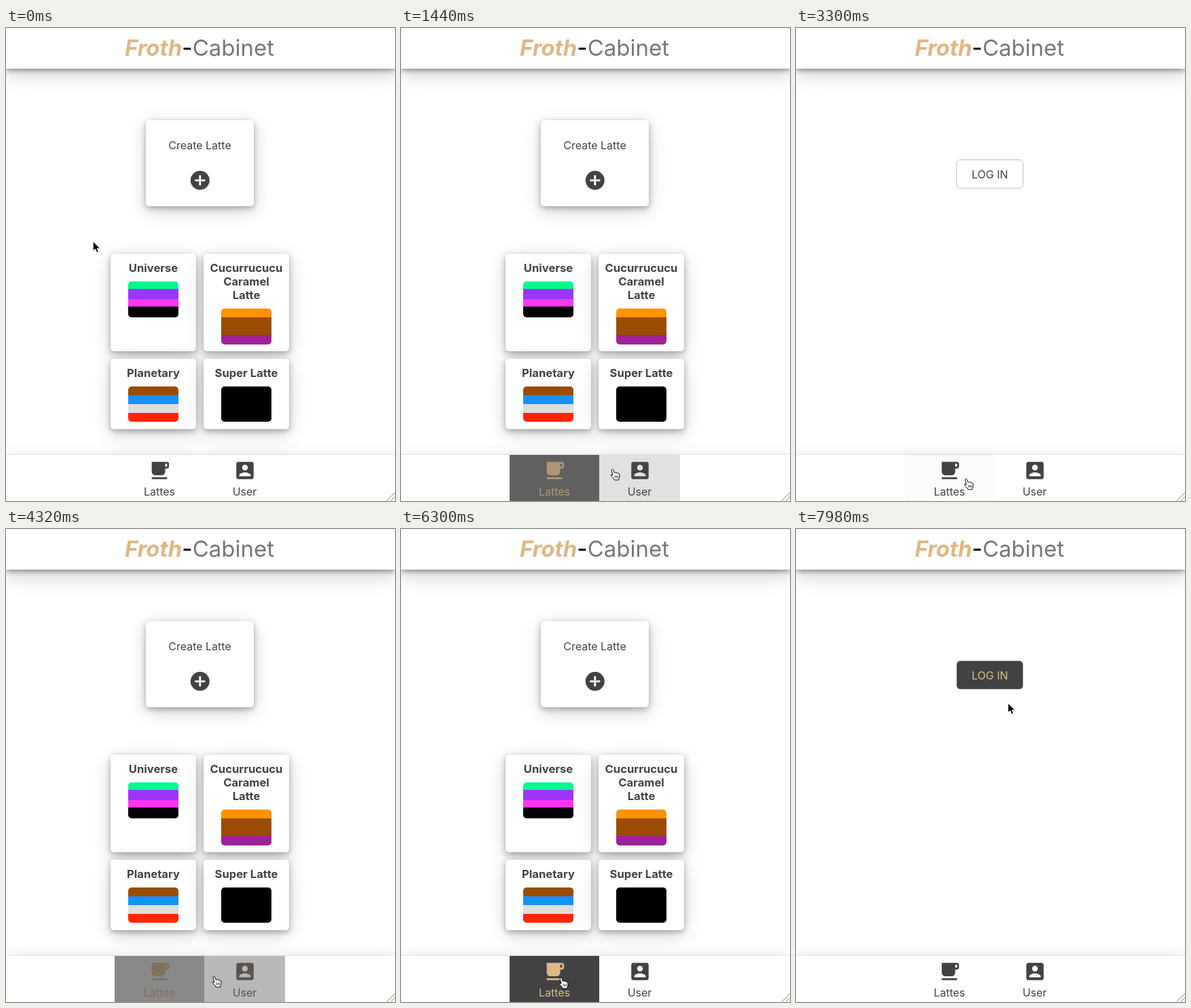
Animation of 573 by 698 pixels, one loop 8 s. Source, as an HTML page:

```html
<!DOCTYPE html>
<html lang="en">
<head>
<meta charset="utf-8">
<title>Froth-Cabinet</title>
<style>
html, body { margin: 0; width: 100%; height: 100%; overflow: hidden; background: #fff; }
body { position: relative; font: 16px/20px Inter, "Open Sans", sans-serif; color: #424242; text-align: center; cursor: default; }
body * { box-sizing: border-box; }
header, footer, .card, .nav, #login, svg { position: absolute; }
header { left: 0; top: 0; width: 573px; height: 60px; background: #fff; font-size: 33px; line-height: 59px;
  color: #777; white-space: nowrap; padding-right: 3px;
  box-shadow: 0 2px 8px rgba(0,0,0,.45), 0 10px 30px rgba(0,0,0,.17); }
header i { color: #deb887; font-weight: 700; }
header b { color: #000; font-weight: 500; }
footer { left: 0; top: 630px; width: 573px; height: 68px; background: #fff; box-shadow: 0 0 2px rgba(0,0,0,.2), 0 -2px 18px rgba(0,0,0,.09); }
.card { width: 126px; background: #fff; border-radius: 5px; padding-top: 11px; font-weight: 700; font-size: 16.6px;
  box-shadow: 0 3px 8px rgba(0,0,0,.3), 0 7px 29px rgba(0,0,0,.17); }
.card div { width: 74px; height: 52.5px; margin: 10px auto 0; border-radius: 5px; }
#create { left: 206px; top: 136px; width: 159px; height: 127px; padding-top: 27px; font-weight: 400; font-size: 16px; }
#create svg { left: 62.7px; top: 72.2px; }
.nav { top: 0; height: 68px; padding-top: 44px; }
.nav svg { top: 5.6px; left: calc(50% - 17px); }
#login { left: 236px; top: 194px; width: 99px; height: 43px; border: 1px solid #c4c4c4; border-radius: 6px; line-height: 43px; }
svg { fill: currentColor; overflow: visible; }
#pointer { left: 0; top: 0; }
</style>
</head>
<body>
<section id="lattes">
  <div class="card" id="create">Create Latte
    <svg width="33.6" height="33.6" viewBox="0 0 24 24"><path d="M12 2a10 10 0 1 0 0 20 10 10 0 1 0 0-20zm5.4 11h-4.4v4.4h-2V13H6.6v-2H11V6.6h2V11h4.4z"/></svg>
  </div>
</section>
<section id="user"><div id="login">LOG IN</div></section>
<header><i>Froth</i><b>-</b>Cabinet</header>
<footer>
  <div class="nav" id="navLattes" style="left:160px;width:132px">Lattes
    <svg width="34" height="34" viewBox="0 0 24 24"><path d="M20 3H4v10c0 2.2 1.8 4 4 4h6c2.2 0 4-1.8 4-4v-3h2c1.1 0 2-.9 2-2V5c0-1.1-.9-2-2-2zm0 5h-2V5h2zM4 19h16v2H4z"/></svg>
  </div>
  <div class="nav" id="navUser" style="left:292px;width:119px">User
    <svg width="34" height="34" viewBox="0 0 24 24"><path d="M3 5v14c0 1.1.9 2 2 2h14c1.1 0 2-.9 2-2V5c0-1.1-.9-2-2-2H5c-1.1 0-2 .9-2 2zm12 4a3 3 0 1 1-6 0 3 3 0 1 1 6 0zm-9 8c0-2 4-3.1 6-3.1s6 1.1 6 3.1v1H6z"/></svg>
  </div>
</footer>
<svg style="left:0;top:0" width="573" height="698"><path d="M561 697.5L573 685.5M567 697.5L573 691.5" stroke="#777"/></svg>
<svg id="pointer" width="18" height="18">
  <path id="arrow" transform="translate(-.7)" d="M0 0V14L3.3 11L5.6 16.3L8 15.2L5.8 10.2H10.2Z" fill="#000" stroke="#fff" stroke-width=".8"/>
  <g id="hand" transform="translate(-4 -1)" stroke="#000" fill="#fff">
    <path d="M5 10L3.2 3.2C2.9 1 5 .4 5.8 2.4L7.4 6.6C8 5.4 9.6 5.5 10 6.8C10.8 5.8 12.2 6.2 12.4 7.4C13.6 6.8 14.8 7.6 14.8 9V12.5L13.5 17H7.5L5.5 14L2.6 11.2C1.2 9.8 2.4 8.6 4 9.6Z"/>
    <path d="M8.2 10.5V14M10.3 10.5V14M12.3 10.5V14" stroke-width=".8"/>
  </g>
</svg>
<script>
const $ = id => document.getElementById(id);

// Each stripe is a colour and its lower edge
function addCard(x, y, h, title, ...stripes) {
  const card = document.createElement('div'), cup = document.createElement('div');
  card.className = 'card';
  card.style.cssText = `left:${x}px;top:${y}px;height:${h}px`;
  card.innerHTML = title;
  const stops = stripes.map(([color, to], i) => `${color} ${i ? stripes[i - 1][1] : 0}px ${to}px`);
  cup.style.background = `linear-gradient(${stops})`;
  card.append(cup);
  $('lattes').append(card);
}
addCard(154, 333, 144, 'Universe', ['#00fa8c', 11], ['#9b35ff', 26], ['#ff35f2', 37], ['#000', 53]);
addCard(291, 333, 144, 'Cucurrucucu<br>Caramel<br>Latte', ['#ff9300', 13], ['#9a4c00', 39], ['#a0209a', 53]);
addCard(154, 487.5, 104, 'Planetary', ['#9a4c00', 13], ['#1692ff', 26], ['#dedede', 39], ['#ff2600', 53]);
addCard(291, 487.5, 104, 'Super Latte', ['#000', 53], ['#000', 53]);

// Pointer moves: start, end, x, y
const moves = [
  [0, 0, 129, 315], [300, 1080, 250, 668], [1140, 1440, 311, 651], [1440, 1740, 345, 545],
  [1860, 2160, 334, 677], [2520, 2880, 290, 330], [2940, 3300, 250, 665], [4000, 4240, 306, 660],
  [4320, 4500, 335, 668], [4640, 4940, 280, 227], [5280, 5400, 316, 211], [5580, 6060, 235, 662],
  [6420, 6600, 335, 670], [7080, 7200, 337, 523], [7200, 7560, 290, 216], [7860, 7980, 313, 257]
];
// Every click swaps the page
const clicks = [2400, 3420, 4560, 6180, 6720];
const white = [255, 255, 255], dark = [66, 66, 66], tan = [222, 184, 135];

const ease = p => p * p * (3 - 2 * p);
const lerp = (a, b, p) => a + (b - a) * p;
const mix = (a, b, p) => `rgb(${a.map((v, i) => lerp(v, b[i], p))})`;
const userPage = t => clicks.filter(c => c <= t).length % 2 === 1;

function pointer(t) {
  let [, , x, y] = moves[0];
  for (const [from, to, nx, ny] of moves.slice(1)) {
    if (t <= from) break;
    const p = ease(Math.min(1, (t - from) / (to - from)));
    x = lerp(x, nx, p);
    y = lerp(y, ny, p);
  }
  return [x, y];
}

function target(el, page, paint) {
  const { left, top, right, bottom } = el.getBoundingClientRect();
  const hit = t => {
    const [x, y] = pointer(t);
    return (page === undefined || page === userPage(t)) && x >= left && x < right && y >= top && y < bottom;
  };
  return { el, hit, paint };
}

function tint(el, p) {
  el.style.background = mix(white, dark, p);
  el.style.color = mix(dark, tan, p * p);
}
const grow = (el, p) => el.style.transform = `scale(${1 + .1 * p})`;

const buttons = [target($('navLattes'), undefined, tint), target($('navUser'), undefined, tint), target($('login'), true, tint)];
const cards = [...document.querySelectorAll('.card')].map(el => target(el, false, grow));

// Hover progress: share of a short, slightly delayed window spent over the element
function hover(hit, t) {
  const delay = 60, span = 240, samples = 24;
  let count = 0;
  for (let i = 0; i < samples; i++) count += hit(t - delay - span * i / samples);
  return ease(count / samples);
}

function draw(now) {
  const t = Math.floor(now % 8000 / 60) * 60;
  $('lattes').hidden = userPage(t);
  $('user').hidden = !userPage(t);
  for (const { el, hit, paint } of [...buttons, ...cards]) paint(el, hover(hit, t));

  const [x, y] = pointer(t), pointing = buttons.some(b => b.hit(t));
  $('pointer').style.transform = `translate(${x}px, ${y}px)`;
  $('hand').style.display = pointing ? '' : 'none';
  $('arrow').style.display = pointing ? 'none' : '';
}

let start;
function loop(now) {
  start ??= now;
  draw(now - start);
  requestAnimationFrame(loop);
}
draw(0);
requestAnimationFrame(loop);
</script>
</body>
</html>
```
